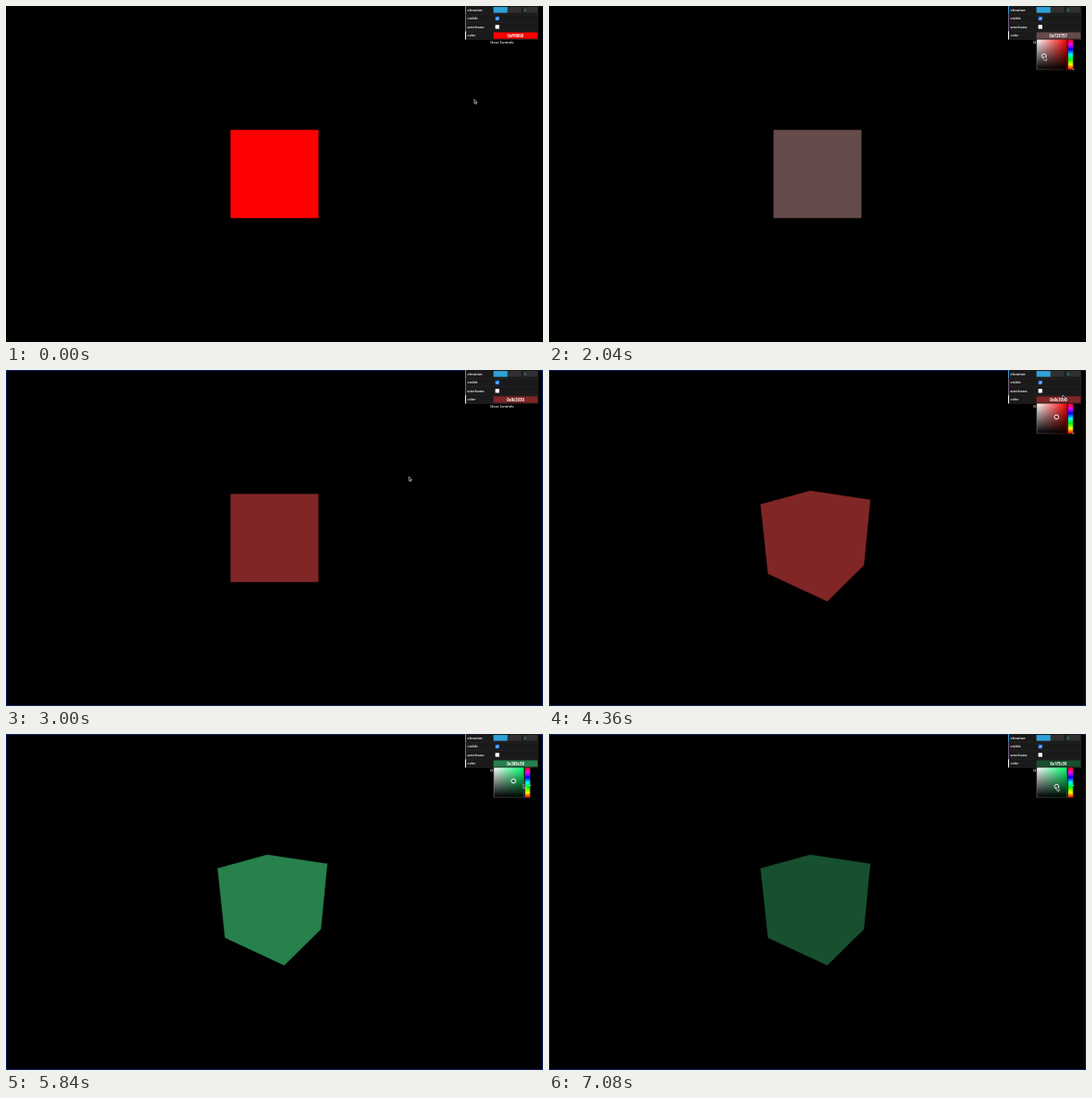
These frames come from a looping animation (600 px wide and 375 px high, 7.12 s). An HTML page:

```html
<!DOCTYPE html>
<html lang="en">
<head>
<meta charset="utf-8">
<title>Cube controls</title>
<style>
  html, body { margin: 0; width: 100%; height: 100%; overflow: hidden; background: #000; }
  svg { display: block; width: 100vw; height: 100vh; }
  text { font: 600 3.8px "Open Sans", "Noto Sans", sans-serif; fill: #fff; }
  #hex { font-weight: 700; font-size: 4.3px; }
</style>
</head>
<body>
<svg viewBox="0 0 600 375" xmlns="http://www.w3.org/2000/svg">
  <defs>
    <linearGradient id="sat">
      <stop stop-color="#fff"/><stop id="pure" offset="1"/>
    </linearGradient>
    <linearGradient id="val" x2="0" y2="1">
      <stop stop-color="#000" stop-opacity="0"/><stop offset="1"/>
    </linearGradient>
    <linearGradient id="hues" x2="0" y2="1"></linearGradient>
  </defs>

  <rect width="600" height="375"/>
  <path id="cube" stroke-width=".7" stroke-linejoin="round"/>
  <rect id="focus" x=".5" y=".5" width="599" height="374" fill="none" stroke="#081f5c"/>

  <rect x="513" width="82" height="37.5" fill="#1a1a1a"/>
  <g id="rows"></g>
  <rect x="544.7" y="1.1" width="31.3" height="6.5" fill="#303030"/>
  <rect x="544.7" y="1.1" width="15.6" height="6.5" fill="#2fa1d6"/>
  <rect x="577.7" y="1.1" width="16.2" height="6.5" fill="#303030"/>
  <text x="578.9" y="5.9" style="fill:#2fa1d6">0</text>
  <rect x="546.7" y="11.7" width="4.5" height="4.5" rx=".7" fill="#2a7fe8"/>
  <path d="M547.7 14l.9 1 1.6-2.1" fill="none" stroke="#fff" stroke-width=".7"/>
  <rect x="546.7" y="21.1" width="4.5" height="4.5" rx=".7" fill="#fff"/>
  <rect id="swatch" x="544.7" y="29.4" width="49.2" height="7.2"/>
  <text id="hex" x="569.2" y="34.6" text-anchor="middle"></text>
  <text x="554" y="42.3" text-anchor="middle">Close Controls</text>

  <g id="picker">
    <rect x="544.2" y="36.9" width="42" height="34.6" fill="#222"/>
    <rect x="545.2" y="37.5" width="33.3" height="33.3" fill="url(#sat)"/>
    <rect x="545.2" y="37.5" width="33.3" height="33.3" fill="url(#val)"/>
    <rect x="580.2" y="37.5" width="5.2" height="33.3" fill="url(#hues)"/>
    <rect id="hueKnob" x="585.2" width="1.3" height="1" fill="#fff"/>
    <circle id="knob" r="2.4"/>
  </g>

  <path id="cursor" d="M0 0V4.7L1.1 3.8 1.9 5.6 2.8 5.2 2 3.5H3.5Z" fill="#111" stroke="#fff" stroke-width=".5"/>
</svg>

<script>
const LOOP = 7120, STEP = 40, TURN = 2 * Math.PI;
const FIELD = { x: 545.2, y: 37.5, size: 33.3 };
const $ = id => document.getElementById(id);
const clamp = (v, lo, hi) => Math.max(lo, Math.min(hi, v));

// Places in the picker for a saturation and value, or for a hue.
const spot = (s, v) => [FIELD.x + FIELD.size * s, FIELD.y + FIELD.size * (1 - v)];
const hueSpot = h => [583, FIELD.y + FIELD.size * (1 - h / 360)];

// The cursor's stops; everything else follows from its drags.
const grab = [450, 119], release = [412.8, 143.7];
const stops = [
  [0, [523, 104]], [680, [571, 31]],
  [1480, spot(1, 1)], [2040, spot(.237, .447)], [2640, spot(.657, .549)],
  [3000, grab], [3080, grab], [3760, release],
  [4360, [574, 28]], [4720, hueSpot(0)], [5160, hueSpot(172.8)], [5720, hueSpot(146)],
  [6040, spot(.657, .549)], [6440, spot(.474, .745)], [7080, spot(.663, .361)]
];

function cursorAt(t) {
  const i = stops.findIndex(([time]) => time > t);
  if (i < 0) return stops[stops.length - 1][1];
  const [t0, a] = stops[i - 1], [t1, b] = stops[i];
  const u = (t - t0) / (t1 - t0), k = u * u * (3 - 2 * u);
  return a.map((v, n) => v + (b[n] - v) * k);
}

const during = (t, from, to) => cursorAt(clamp(t, from, to));

function colorAt(t) {
  const [x, y] = t < 6040 ? during(t, 1480, 2640) : during(t, 6040, 7080);
  const hueY = during(t, 4720, 5720)[1];
  const part = v => clamp(v / FIELD.size, 0, 1);
  return [360 * (1 - part(hueY - FIELD.y)), part(x - FIELD.x), 1 - part(y - FIELD.y)];
}

// Before the hue drag the bar rests at red.
const hueAt = (t, h) => t < 4720 ? 0 : h;

function hsv(h, s, v) {
  return [5, 3, 1].map(n => {
    const k = (n + h / 60) % 6;
    return Math.round(255 * v * (1 - s * clamp(Math.min(k, 4 - k), 0, 1)));
  });
}

const hexText = rgb => "0x" + rgb.map(c => c.toString(16).padStart(2, "0")).join("");
const css = rgb => `rgb(${rgb})`;
// The screen shows mid tones slightly darker.
const shown = rgb => css(rgb.map(c => Math.round(255 * (c / 255) ** 1.14)));

function project([x, y, z], az, el) {
  const sx = x * Math.cos(az) - z * Math.sin(az);
  const sz = x * Math.sin(az) + z * Math.cos(az);
  const depth = 3 - sz * Math.cos(el) - y * Math.sin(el);
  const scale = 187.5 / Math.tan(TURN * 37.5 / 360) / depth;
  return [300 + sx * scale, 187.5 - (y * Math.cos(el) - sz * Math.sin(el)) * scale];
}

// Outline of every face that looks at the camera.
function cubePath(az, el) {
  let d = "";
  for (let axis = 0; axis < 3; axis++) for (const side of [-.5, .5]) {
    const pts = [0, 1, 2, 3].map(i => {
      const p = [];
      p[axis] = side;
      p[(axis + 1) % 3] = (i === 1 || i === 2 ? 1 : -1) * side;
      p[(axis + 2) % 3] = i < 2 ? -.5 : .5;
      return project(p, az, el);
    });
    const area = pts.reduce((sum, p, i) => {
      const q = pts[(i + 1) % 4];
      return sum + p[0] * q[1] - q[0] * p[1];
    }, 0);
    if (area < 0) d += "M" + pts.map(p => p.map(n => n.toFixed(2)).join(" ")).join("L") + "Z";
  }
  return d;
}

function set(id, attrs) {
  for (const name in attrs) $(id).setAttribute(name, attrs[name]);
}
const show = (id, on) => set(id, { visibility: on ? "visible" : "hidden" });

function draw(t) {
  const [rawHue, s, v] = colorAt(t);
  const h = hueAt(t, rawHue);
  const rgb = hsv(h, s, v), paint = shown(rgb);
  const ink = v < .5 || s > .5 ? "#fff" : "#000";

  // Orbit: one full turn per stage height dragged.
  const [dx, dy] = during(t, 3080, 3760);
  const angle = px => px / 375 * TURN;
  set("cube", { d: cubePath(angle(grab[0] - dx), angle(dy - grab[1])), fill: paint, stroke: paint });
  show("focus", t >= 2960);

  set("swatch", { fill: paint });
  $("hex").textContent = hexText(rgb);
  $("hex").style.fill = ink;

  show("picker", (t >= 680 && t < 2840) || t >= 4320);
  set("pure", { "stop-color": css(hsv(h, 1, 1)) });
  set("hueKnob", { y: hueSpot(h)[1] - .5 });
  const [cx, cy] = spot(s, v);
  set("knob", { cx, cy, fill: paint, stroke: ink });
  set("cursor", { transform: `translate(${cursorAt(t)})` });
}

const rows = { elevation: "#2fa1d6", visible: "#806787", wireframe: "#806787", color: "#fff" };
$("rows").innerHTML = Object.entries(rows).map(([name, edge], i) => {
  const y = i * 9.4;
  return `<rect x="513" y="${y}" width="1" height="9.2" fill="${edge}"/>
    <rect x="514" y="${y + 9}" width="81" height=".4" fill="#2c2c2c"/>
    <text x="515.6" y="${y + 5.9}">${name}</text>`;
}).join("");

$("hues").innerHTML = [...Array(7).keys()].map(i =>
  `<stop offset="${i / 6}" stop-color="${css(hsv(360 - i * 60, 1, 1))}"/>`).join("");

const start = performance.now();
function tick() {
  const t = (performance.now() - start) % LOOP;
  draw(Math.floor(t / STEP) * STEP);
  requestAnimationFrame(tick);
}
tick();
</script>
</body>
</html>
```
